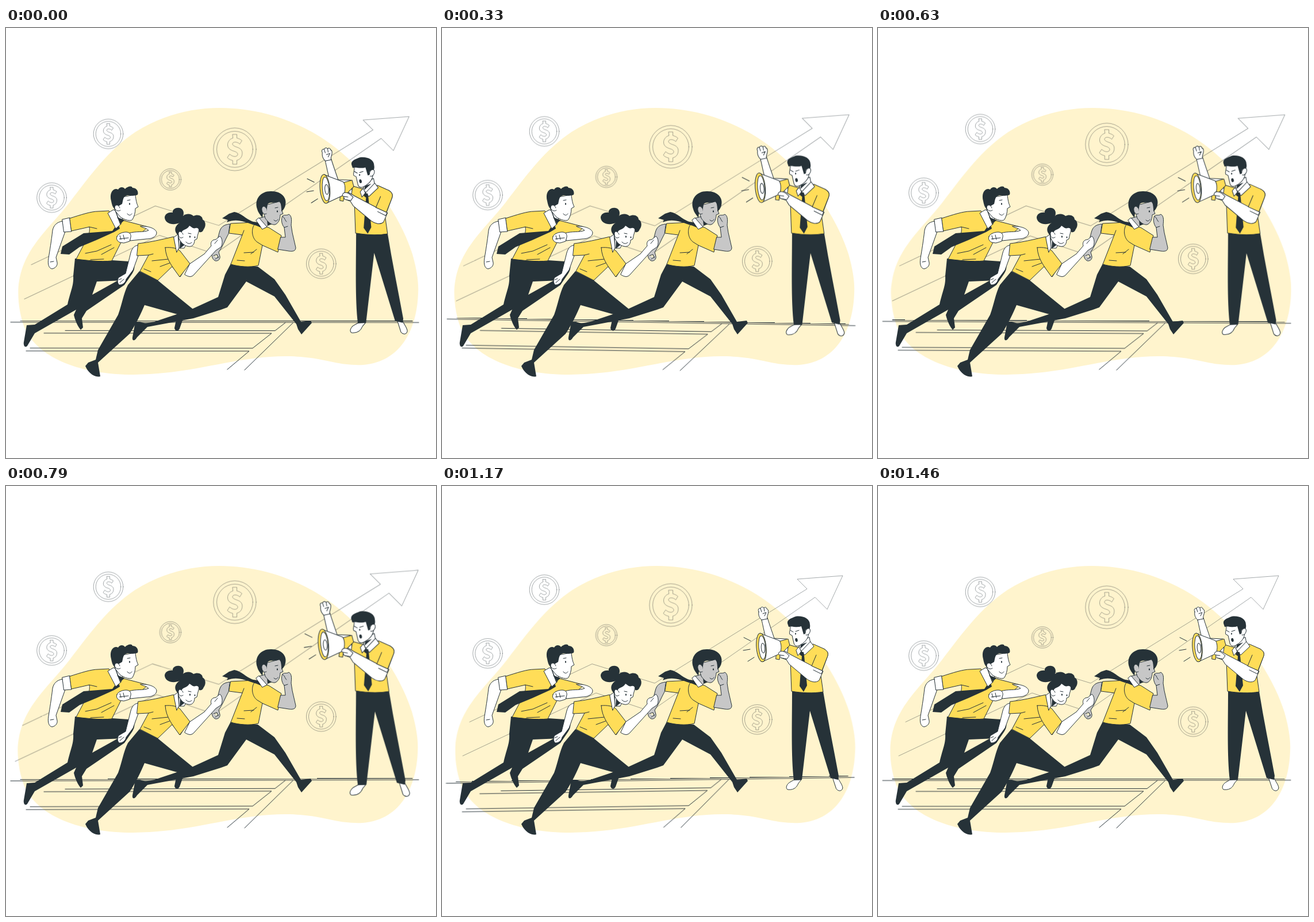
An HTML page that plays this animation: 748 px wide and 748 px high, repeating every 1.5 s.

```html
<!DOCTYPE html>
<html lang="en">
<head>
<meta charset="utf-8">
<title>Team race</title>
<style>
  html, body { margin: 0; width: 100%; height: 100%; overflow: hidden; background: #fff; }
  svg { display: block; width: 100vw; height: 100vh; }
  path, ellipse, circle { stroke-linecap: round; stroke-linejoin: round; }
  .ink { fill: #263238; stroke: none; }
  .shirt { fill: #ffdd58; stroke: #263238; }
  .skin { fill: #fff; stroke: #263238; }
  .tan { fill: #c7c7c7; stroke: #263238; }
  .line { fill: none; stroke: #263238; }
  .faint { fill: none; stroke: #263238; stroke-opacity: .42; }
  .cream { fill: #fff4cd; }

  .shake, .beat, .float, .sway { animation: 1.5s linear -18ms infinite; }
  .shake { animation-name: shake; }
  .beat { animation-name: beat; }
  .float { animation-name: float; }
  .sway { animation-name: sway; transform-origin: 363px 552px; }
  #arrow { transform-origin: 366px 312px; }
  #coach { transform-origin: 611px 370px; }

  @keyframes float { 50% { transform: translateY(-10px); } }
  @keyframes sway {
    25% { transform: rotate(1deg); }
    75% { transform: rotate(-1deg); }
  }
  @keyframes beat {
    0%, 30%, 40%, 60%, 100% { transform: scale(1); }
    10%, 50% { transform: scale(1.1); }
  }
  @keyframes shake {
    0%, 100% { transform: translateX(0); }
    10%, 90% { transform: translateX(-1px); }
    20%, 80% { transform: translateX(2px); }
    30%, 50%, 70% { transform: translateX(-4px); }
    40%, 60% { transform: translateX(4px); }
  }
</style>
</head>
<body>
<svg viewBox="0 0 748 748">
  <defs>
    <g id="coin">
      <circle r="25.8" vector-effect="non-scaling-stroke"/>
      <circle r="21.8" vector-effect="non-scaling-stroke"/>
      <path vector-effect="non-scaling-stroke" d="M-2.5-18H2.5V-13.6C5-13 7-12 8.6-10.5L6-6.3C4-8.5 0-9.6-2-8C-4-6-2-4.2 2-2.8C7-1.2 9.2 1 9 5.2C8.800 9.5 6 12.5 2.5 13.2V18H-2.5V13.5C-5 13-7.5 11.8-9 10L-6.2 5.8C-3 8.800 1 9.6 3 7.5C4.4 5.5 3 3.6 0 2.6C-6 .8-9-1.5-8.6-6.5C-8-10-5.5-12.8-2.5-13.5Z"/>
    </g>
  </defs>

  <path class="cream shake" d="M372 139C452 139 532 169 592 224C652 275 691 342 707 393C716 425 718 445 717 462C715 520 690 580 622 586C570 588 555 572 490 571C400 570 330 602 222 603C130 603 60 575 35 527C22 500 19 460 23 440C32 382 77 347 111 303C150 252 179 212 225 181C270 153 320 139 372 139Z"/>

  <path id="arrow" class="faint beat" d="M48 410.500L261 309.500L370 343L635 179L618 162L697 156L670 214.500L649 193.500L363 392L268 360L36 469.500"/>

  <g class="faint float">
    <use href="#coin" transform="translate(178 184.500)"/>
    <use href="#coin" transform="translate(398 211.300)scale(1.44)"/>
    <use href="#coin" transform="translate(286 263.700)scale(.72)"/>
    <use href="#coin" transform="translate(79.500 295.300)"/>
    <use href="#coin" transform="translate(548.300 410.300)"/>
  </g>

  <path class="line sway" d="M8 512H718M25 509.500H707M103 526.500H468L486 512.500M66 531H462L429 557H42M35 562H423L385 594M499 513L415 595"/>

  <!-- coach -->
  <g id="coach" class="beat">
    <path class="line" d="M525 263.500L537 269.500M524 286L536 284M532 305L543 298"/>
    <path class="skin" d="M613 511H625L620 517C616 527 609 529 601 528C597 525 600 519 604 516ZM680 508L688 506C691 514 696 518 697 525C696 531 690 532 686 527Z"/>
    <path class="ink" d="M609 357H663C671 407 681 455 690 504L689 511L676 508L640 391L626 511L612 512C607 470 609 410 609 357Z"/>
    <path class="skin" d="M556 233L566 229C570 242 574 253 578 265L600 266L603 292L572 286C563 270 560 250 556 233Z"/>
    <path class="skin" d="M551 219C549 215 551 212 554 213C555 210 558 210 560 212C562 210 565 211 565 214C568 214 568 219 567 223C566 227 565 229 566 231L556 233C552 229 550 225 551 219ZM554 213L556 219M560 212L561 218M558 222L564 220L561 226"/>
    <path class="shirt" d="M603 276L620 281L646 275L664 283C671 287 673 291 670 298L661 322L659 330L663 358C646 361 626 360 608 357L606 302L600 299Z"/>
    <path class="skin" d="M624 270L639 263L641 274L628 289L621 283Z"/>
    <path class="ink" d="M624 276L635 272L623 283Z"/>
    <path class="skin" d="M605 241C608 249 603 253 605 258L609 260L612 273C613 279 619 280 624 276C633 271 639 263 638 251L637 238H608Z"/>
    <path class="ink" d="M601 239C600 232 608 230 615 227C627 225 640 230 640 241C641 246 639 250 637 252C634 247 631 250 632 257L629 258L625 244C617 247 608 243 603 245Z"/>
    <path class="skin" d="M632 256C632 249 637 246 640 249C642 254 637 261 633 259"/>
    <path class="line" d="M606 251L611 254M615 253L621 251"/>
    <ellipse class="ink" cx="615" cy="257" rx="1" ry="1.600"/>
    <ellipse class="ink" cx="616.500" cy="268" rx="2.200" ry="3.300" transform="rotate(-10 616 268)"/>
    <path class="skin" d="M621 280L625 288L619 295L616 286ZM641 271L647 279L631 294L625 288Z"/>
    <path class="ink" d="M624 288L629 289L630 295L635 347L629 358L622 348L626 296L622 293Z"/>
    <path class="skin" d="M587 288L596 287L606 293L644 313L663 322L656 338C651 343 642 341 635 336L604 310L599 302L590 299Z"/>
    <path class="shirt" d="M664 283C671 287 673 291 670 298L661 321L643 313L651 294"/>
    <path class="line" d="M646 320L660 327L662 322"/>
    <path class="shirt" d="M582 290L589 289L587 302L581 301ZM584 271L602 266L605 277L592 290L584 290Z"/>
    <path class="skin" d="M555 257L587 269C591 274 591 287 587 292L559 305Z"/>
    <ellipse class="shirt" cx="555.500" cy="281" rx="8.500" ry="25" transform="rotate(-5 555 281)"/>
    <ellipse class="skin" cx="557" cy="281" rx="6" ry="20.500" transform="rotate(-5 557 281)"/>
    <ellipse class="skin" cx="558.500" cy="282" rx="3.200" ry="8.500" transform="rotate(-5 558 282)"/>
    <path class="skin" d="M586 290C588 286 594 287 598 290L604 295L600 301L590 299C587 297 588 295 588 294C585 294 585 291 586 290ZM588 294L595 295"/>
  </g>

  <!-- left runner -->
  <g>
    <path class="ink" d="M120 401L184 404L214 406C225 408 226 418 219 428L206 447L140 492L132 505L134 521L130 525C125 520 120 508 118 499L122 490L50 531L37 553C32 558 30 550 31 546L36 517L50 516L107 481C113 455 118 448 117 431Z"/>
    <path class="cream" d="M158 441L194 439.500L150 464Z"/>
    <path class="skin" d="M98 336C88 338 83 343 81 352C79 370 76 388 74 400C72 412 75 418 80 419C86 418 90 413 89 408L87 399L103 354ZM77 407L83 406"/>
    <path class="skin" d="M98 333L111 330L114 354L101 355Z"/>
    <path class="shirt" d="M111 331C130 325 148 319 160 319L179 318L194 341L205 335L247 346L236 356L205 363L184 405C164 407 139 404 122 402L141 366C145 358 146 352 145 346L114 353Z"/>
    <path class="line" d="M145 346L158 349M183 377L158 388L138 392M188 382L166 394M147 403L170 402"/>
    <path class="skin" d="M234 345C248 344 261 349 262 356C262 364 252 367 244 367L216 370L214 357C225 353 240 356 248 352C243 347 238 348 234 345Z"/>
    <path class="skin" d="M193 363C194 358 203 355 209 355C215 355 218 359 217 364L215 371L205 374L198 373C194 371 191 367 193 363ZM198 361L200 368M204 360L206 368M197 367L213 365"/>
    <path class="ink" d="M185 353L195 339L198 349L188 355L157 369L128 381L110 394L95 393L98 380L135 357Z"/>
    <path class="skin" d="M188 312L199 342L191 349L177 322L187 316L204 326L200 341Z"/>
    <path class="ink" d="M193 329L206 334L200 340Z"/>
    <path class="skin" d="M202 294L225 290C226 299 227 305 230 311L225 314C225 321 223 328 220 333C217 337 207 334 199 329L190 318Z"/>
    <path class="ink" d="M183 301C179 287 187 277 195 281C198 276 204 276 207 280C212 275 219 274 220 278C227 278 231 284 229 290C223 293 216 291 211 291C203 293 204 299 202 306L197 309L189 315C185 311 184 306 183 301Z"/>
    <path class="skin" d="M198 313C196 307 190 306 189 312C189 317 195 320 199 317"/>
    <path class="line" d="M211 323C214 327 217 326 219 323M211 300L216 299"/>
    <ellipse class="ink" cx="215" cy="306" rx="1.100" ry="1.800"/>
  </g>

  <!-- right runner -->
  <g>
    <path class="ink" d="M391 410L438 415L467 437L486 464L513 511L530 509L532 513L514 533L508 524L505 515L467 467L418 441L385 486L374 490L326 505L246 520L228 538C224 545 219 545 220 538L225 511L233 511C243 515 248 513 258 511L321 490L369 468L381 429Z"/>
    <path class="tan" d="M389 341C378 342 373 347 371 356L366 375L359 387C357 395 358 402 364 405C369 406 373 402 372 397L370 390C377 380 381 369 387 358ZM361 396L367 394L369 400M364 402L370 398"/>
    <path class="shirt" d="M391 340L431 338C441 337 448 346 457 347L479 361L473 390L446 378L439 413C424 417 405 415 391 411L411 360L388 357Z"/>
    <path class="line" d="M411 360L414 352M432 342C425 352 429 368 438 373L446 378M431 390L414 391M436 385L426 393M402 404L415 405"/>
    <path class="tan" d="M478 364L486 364L484 347C478 340 479 330 481 327C484 324 488 327 492 324C497 327 497 333 496 343L498 356L504 382C504 388 499 389 492 388L473 385ZM481 328C485 329 485 335 488 337M484 347L490 345"/>
    <path class="tan" d="M440 331L454 327L457 342L451 348L442 342Z"/>
    <path class="ink" d="M436 338C421 337 411 322 397 320L388 323L376 331L386 334L384 338C401 331 412 336 436 344L443 347V341Z"/>
    <path class="skin" d="M435 334L440 330L454 346L446 350Z"/>
    <path class="ink" d="M454 333L463 341L455 344Z"/>
    <path class="tan" d="M452 308L478 301C480 309 478 315 482 323L477 325C477 332 474 340 468 342C462 343 456 338 451 331L447 318Z"/>
    <path class="ink" d="M437 315C431 297 444 283 462 284C480 284 489 296 486 308C485 314 481 318 479 319C480 310 478 304 475 302C468 306 458 301 455 307L453 319L447 323L446 330C442 325 438 320 437 315Z"/>
    <path class="tan" d="M453 314C449 307 444 311 445 317C446 323 450 325 453 323"/>
    <path class="line" d="M468 313L473 312M466 334C469 337 471 336 473 333"/>
    <ellipse class="ink" cx="472" cy="319" rx="1.100" ry="1.800"/>
  </g>

  <!-- middle runner -->
  <g>
    <path class="ink" d="M232 423L264 439L292 462L324 488C328 493 325 499 319 500L308 506L302 523C300 528 294 528 293 522L298 498L241 482C235 496 227 514 215 532L160 582L164 606C153 609 142 598 138 588L143 582L156 577L160 560L195 499C202 480 204 463 212 447Z"/>
    <path class="skin" d="M230 378C223 378 219 384 217 391L208 427L196 434C193 439 194 444 197 447C203 447 208 443 209 437L221 421L230 396ZM196 438L201 436M198 443L205 437"/>
    <path class="shirt" d="M230 375C250 373 270 368 292 363L301 389L318 409L303 433L289 415L264 439L233 423L248 395L228 396Z"/>
    <path class="line" d="M248 395L256 393M283 402L254 405M287 408L268 415M240 419L252 424"/>
    <path class="shirt" d="M277 382C288 381 298 383 303 388L320 410L302 433C291 417 278 403 277 382Z"/>
    <path class="skin" d="M320 410L345 393L357 379C355 372 359 368 365 368L372 362C377 366 377 376 374 381L365 387L327 429C322 435 316 432 311 429ZM363 375L368 369"/>
    <path class="skin" d="M301 360L315 373L310 383L301 383Z"/>
    <path class="ink" d="M303 368L315 374L302 384Z"/>
    <path class="skin" d="M292 364L299 359L301 382L297 390Z"/>
    <path class="skin" d="M304 351L321 341L336 347C336 354 333 360 332 367L328 369C328 376 324 381 318 380C309 379 303 372 300 364Z"/>
    <path class="ink" d="M302 339C290 344 277 340 276 330C276 323 284 320 290 321C289 313 302 310 307 316C310 320 309 324 308 327C314 322 322 323 326 327C334 323 342 327 342 333C348 336 348 345 344 350C342 355 339 356 336 355C336 350 334 347 330 348C325 350 322 345 319 344C316 350 310 350 307 353L301 362C293 356 291 346 302 339Z"/>
    <path class="skin" d="M308 359C305 352 299 353 300 359C300 364 304 367 308 364"/>
    <path class="line" d="M317 357L322 358M313 372C316 376 320 376 323 373"/>
    <ellipse class="ink" cx="320" cy="363" rx="1.100" ry="1.800"/>
    <ellipse class="ink" cx="328.500" cy="364" rx="1" ry="1.600"/>
  </g>
</svg>
</body>
</html>
```
